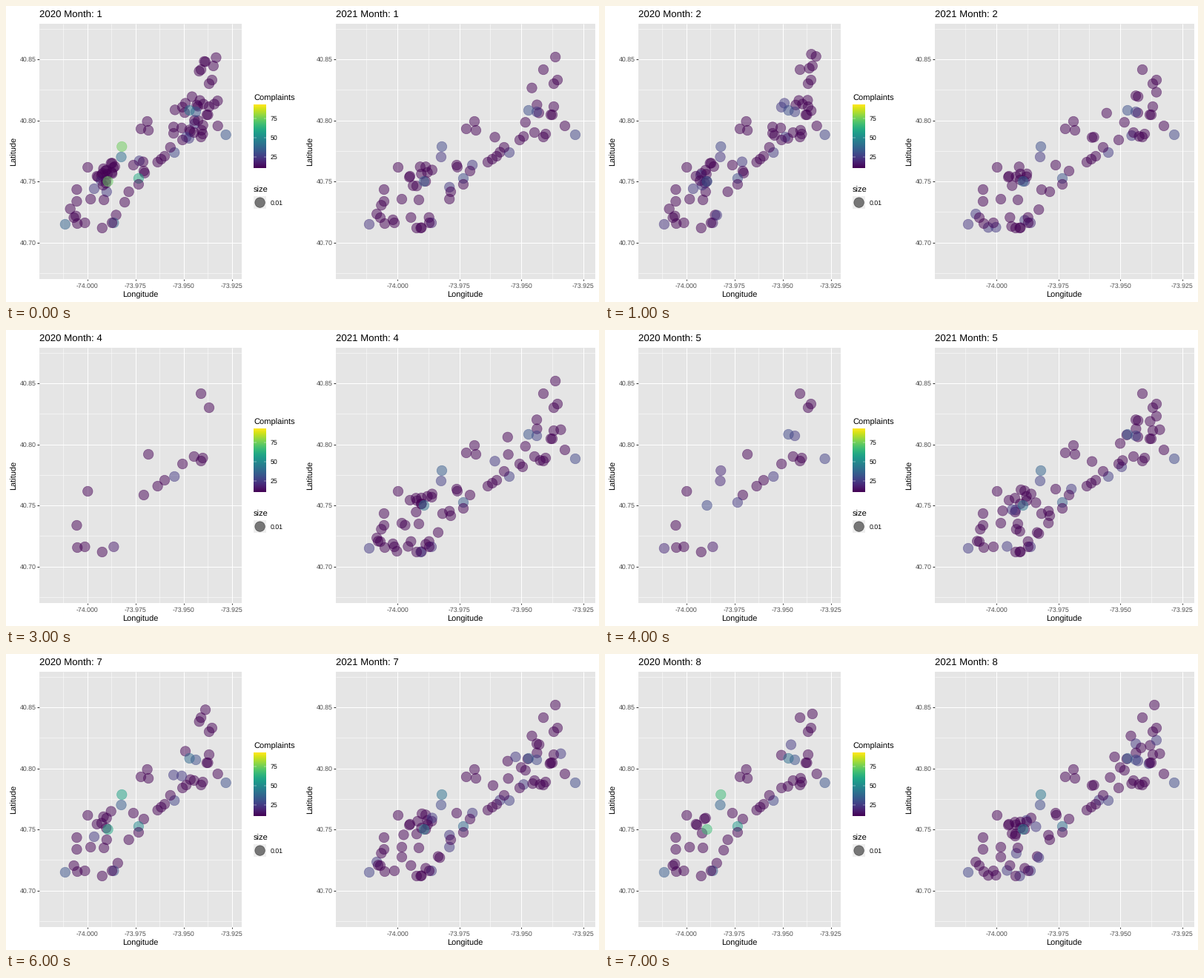
Write a matplotlib script that moves like this. It is 800 by 400 pixels and loops after 8 s.

```python
import matplotlib.pyplot as plt
import numpy as np
from matplotlib.animation import FuncAnimation
from matplotlib.patches import Circle, Rectangle

W, H, DPI = 800, 400, 100
PX = 72 / DPI  # points per pixel
TOP, BOTTOM = 23.5, 368.5
PANELS = {2020: (45, 317.5, 109.5, 2604), 2021: (445, 794.5, 528, 3340)}  # left, right, x of -74, px per degree
LOW, HIGH = 10.5, 92.5  # range of complaint counts

plt.rcParams["font.family"] = "Liberation Sans"
plt.rcParams["text.hinting"] = "none"

# Recurring sites, busiest first, in pixels of the wider (2021) panel
CORE = [(725, 86), (739, 105), (634, 168), (713, 171), (728, 173), (725, 177), (693, 181), (679, 198),
        (662, 203), (650, 211), (626, 223), (529, 218), (510, 264), (511, 294), (524, 293), (554, 300),
        (574, 293)]
OFTEN = [(744, 100), (739, 136), (632, 156), (621, 166), (754, 162), (672, 191), (545, 230),
         (510, 248), (505, 286), (617, 241), (600, 251), (735, 147), (737, 147), (656, 207),
         (557, 262), (534, 261), (571, 293), (608, 215)]
# Hot sites with their quiet and peak complaint counts
HOT = {(768, 174): (26, 32), (716, 143): (24, 32), (588, 190): (20, 74), (564, 237): (28, 73),
       (617, 233): (24, 60), (705, 141): (28, 42), (490, 295): (20, 36), (587, 204): (20, 40),
       (679, 198): (24, 28), (574, 293): (16, 36)}
LANDMARKS = CORE + [p for p in HOT if p not in CORE] + OFTEN

# Areas of scattered sites: center, reach along and across the island, share
AREAS = [(552, 262, 62, 42, 0.32), (562, 228, 20, 11, 0.22), (640, 202, 50, 16, 0.12),
         (712, 145, 46, 40, 0.29), (738, 78, 24, 8, 0.05)]
SLOPE = np.radians(-41)


def scatter_sites(rng, n):
    """Random sites spread evenly over tilted ellipses."""
    area = np.array(AREAS)
    pick = rng.choice(len(area), n, p=area[:, 4] / area[:, 4].sum())
    x, y, along, across, _ = area[pick].T
    r, angle = np.sqrt(rng.random(n)), rng.random(n) * 2 * np.pi
    a, b = along * r * np.cos(angle), across * r * np.sin(angle)
    c, s = np.cos(SLOPE), np.sin(SLOPE)
    return np.column_stack([x + a * c - b * s, y + a * s + b * c])


def site_count(year, month):
    if year == 2021:
        return round(68 + 2.6 * month)
    return [97, 80, 62, 17, 26, 39, 58, 55][month - 1]


def season(year, month):
    """How close the hot sites are to their peak, from 0 to 1."""
    if year == 2021:
        return 0.1 + 0.04 * month
    return np.exp(-(month - 1) ** 2 * 2) + np.exp(-(month - 7.6) ** 2)


POOLS = {year: scatter_sites(np.random.default_rng(year), 70) for year in PANELS}


def month_data(year, month):
    """Sites of a month and their complaint counts."""
    rng = np.random.default_rng(year * 100 + month)
    n = site_count(year, month)
    known = LANDMARKS[:n]
    extra = rng.permutation(POOLS[year])[:n - len(known)]
    mild = np.where(rng.random(len(extra)) < 0.12, 24, LOW)
    near = season(year, month)
    heat = [quiet + (peak - quiet) * near
            for quiet, peak in (HOT.get(p, (LOW, LOW)) for p in known)]
    return np.vstack([extra, known]), np.concatenate([mild, heat])


fig = plt.figure(figsize=(W / DPI, H / DPI), dpi=DPI, facecolor="white")
ax = fig.add_axes([0, 0, 1, 1])
ax.axis("off")


def label(x, y, s, size, color="black", ha="left", rotation=0):
    return ax.text(x, y, s, fontsize=size * PX, color=color, ha=ha, va="baseline",
                   rotation=rotation, rotation_mode="anchor")


def line(xs, ys, width, color="white", z=2):
    ax.plot(xs, ys, color=color, lw=width * PX, solid_capstyle="butt", zorder=z)


def grid_line(xs, ys, major):
    line(xs, ys, 1.07 if major else 0.53, z=2.1 if major else 2)


def draw_panel(year):
    left, right, origin, scale = PANELS[year]
    box = Rectangle((left, TOP), right - left, BOTTOM - TOP, fc="#E5E5E5", lw=0, zorder=1)
    ax.add_patch(box)
    for k in range(-1, 7):
        x, major = origin + k * 0.0125 * scale, k % 2 == 0
        if left < x < right:
            grid_line([x, x], [TOP, BOTTOM], major)
            if major:
                line([x, x], [BOTTOM, BOTTOM + 2.75], 1.07, "#333333")
                label(x, 380.5, f"{-74 + k * 0.0125:.3f}", 8.8, "#4D4D4D", "center")
    for k in range(-1, 8):
        y, major = 319.5 - k * 41.25, k % 2 == 0
        grid_line([left, right], [y, y], major)
        if major:
            line([left - 2.75, left], [y, y], 1.07, "#333333")
            label(left - 4.2, y + 3.2, f"{40.7 + k * 0.025:.2f}", 8.8, "#4D4D4D", "right")
    label((left + right) / 2, 393.3, "Longitude", 11, ha="center")
    label(left - 31.5, (TOP + BOTTOM) / 2 + 0.7, "Latitude", 11, ha="center", rotation=90)
    dots = ax.scatter([], [], s=(13.5 * PX) ** 2, linewidths=0.7 * PX, zorder=4)
    dots.set_clip_path(box)
    return label(left, 15.3, "", 13.3), dots


def draw_legend():
    label(334, 127.7, "Complaints", 11.1)
    ramp = np.linspace(1, 0, 256)[:, None]
    ax.imshow(ramp, cmap="viridis", extent=(334, 351, 219, 133.4), aspect="auto",
              interpolation="bilinear", zorder=1)
    for value in (25, 50, 75):
        y = 230 - value * 1.04
        line([334, 337.5], [y, y], 0.4)
        line([347.5, 351], [y, y], 0.4)
        label(357, y + 3.2, str(value), 8.8)
    label(334, 252, "size", 11.1)
    ax.add_patch(Rectangle((334, 257), 17.3, 17.3, fc="#EEEEEE", lw=0, zorder=1))
    ax.add_patch(Circle((342.6, 265.6), 6.75, fc=(0, 0, 0, 0.5), ec=(0, 0, 0, 0.5),
                        lw=0.7 * PX, zorder=2))
    label(357, 269, "0.01", 8.8)


panels = {year: draw_panel(year) for year in PANELS}
draw_legend()
ax.set_xlim(0, W)
ax.set_ylim(H, 0)


def update(i):
    month = i + 1
    for year, (title, dots) in panels.items():
        _, _, origin, scale = PANELS[year]
        title.set_text(f"{year} Month: {month}")
        spots, heat = month_data(year, month)
        spots[:, 0] = origin + (spots[:, 0] - 528) * scale / 3340
        colors = plt.cm.viridis((heat - LOW) / (HIGH - LOW), alpha=0.5)
        dots.set_offsets(spots)
        dots.set_facecolor(colors)
        dots.set_edgecolor(colors)
    return [artist for pair in panels.values() for artist in pair]


anim = FuncAnimation(fig, update, frames=8, interval=1000, repeat=True, repeat_delay=0)
plt.show()
```
